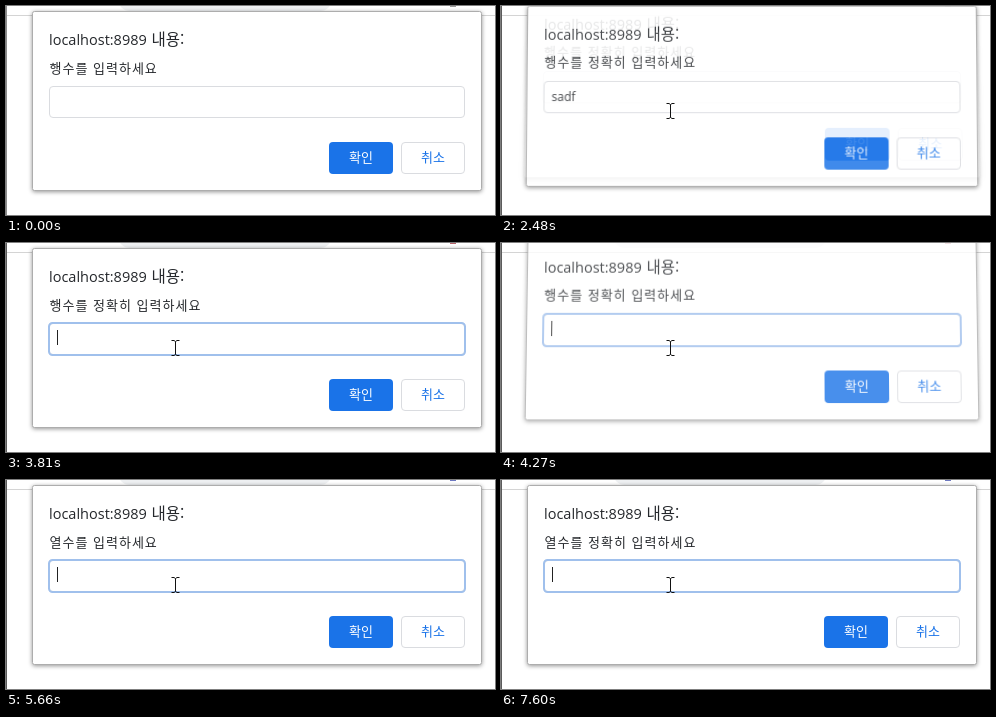
An HTML page that plays this animation: 489 px wide and 209 px high, repeating every 8 s.

```html
<!DOCTYPE html>
<html lang="ko">
<head>
<meta charset="utf-8">
<title>Prompt dialog</title>
<style>
  html, body { margin: 0; width: 100%; height: 100%; overflow: hidden; background: #fff; }
  svg { position: absolute; left: 0; top: 0; width: 489px; height: 209px; }
  .dialog { transform-origin: 251px 95.5px; }
  .panel { filter: drop-shadow(0 1px 2px rgba(0, 0, 0, .42)); }
  text { font-family: "Open Sans", "Noto Sans CJK KR", "Noto Sans CJK", sans-serif; fill: #24272b; }
  .ko { font-family: "Noto Sans CJK KR", "Noto Sans CJK", sans-serif; }
  .host { font-size: 14.5px; }
  .title { font-size: 15.5px; }
  .label { font-size: 13px; letter-spacing: 1px; }
  .value { font-size: 12px; }
  .button { font-size: 13px; text-anchor: middle; }
</style>
</head>
<body>
<svg viewBox="0 0 489 209">
  <rect x="112" y="-20" width="214" height="25" rx="12" fill="#eef0f2"/>
  <rect y="9" width="489" height="1" fill="#d4d4d4"/>
  <rect id="mark" x="444" width="6" height="1"/>
  <rect id="edge" width="1" height="209"/>
</svg>

<svg id="main" class="dialog" viewBox="0 0 489 209">
  <rect class="panel" x="26.5" y="5.5" width="449" height="179" rx="2" fill="#fff" stroke="#adadad"/>
  <text class="host" x="43" y="39">localhost:8989</text>
  <text class="title ko" x="145.5" y="39">내용:</text>
  <text class="label ko" x="43.5" y="66.5"></text>
  <rect class="field" x="43.5" y="80.5" width="415" height="31" rx="3.5" fill="#fff" stroke="#dadce0"/>
  <rect class="ring" x="43" y="80" width="416" height="32" rx="3.5" fill="none" stroke="#a0c0ec" stroke-width="2"/>
  <text class="value" x="51" y="100"></text>
  <rect class="caret" y="87" width="1" height="15" fill="#222"/>
  <rect x="323" y="136" width="64" height="32" rx="4" fill="#1a73e8"/>
  <text class="button ko" x="355" y="156.3" style="fill:#fff;font-weight:500">확인</text>
  <rect x="395.5" y="136.5" width="63" height="31" rx="3.5" fill="#fff" stroke="#dadce0"/>
  <text class="button ko" x="427" y="156.3" style="fill:#1a73e8">취소</text>
</svg>

<svg viewBox="0 0 489 209">
  <path id="arrow" d="M.5.5V15.5L4 12.2 6.4 17.8 8.8 16.8 6.5 11.3H11.3Z" fill="#fff" stroke="#000"/>
  <path id="beam" d="M-3.5-7.5H-1L.5-6.5 2-7.5H4.5M.5-6.5V6.5M-3.5 7.5H-1L.5 6.5 2 7.5H4.5" fill="none" stroke="#111"/>
</svg>

<script>
const LOOP = 8000;
const ROW = "행수를 입력하세요";
const ROW_AGAIN = "행수를 정확히 입력하세요";
const COL = "열수를 입력하세요";
const COL_AGAIN = "열수를 정확히 입력하세요";
const CHAR = { s: 5.7, a: 6.7, d: 7.4, f: 4, 3: 6.9 };

const $ = id => document.getElementById(id);
const main = $("main");
const ghost = main.cloneNode(true);
ghost.removeAttribute("id");
main.after(ghost);

// Each step holds until the next one starts.
const steps = [];
let now = { msg: ROW, value: "", caret: false, ring: false, lift: 0, alpha: 1, next: "" };
function at(time, change) {
  now = { ...now, next: "", ...change };
  steps.push({ time, ...now });
}
function type(time, value, caret = true) {
  at(time, { value, caret });
}
// The answered dialog lifts off while the following one drops in.
function swap(times, msg) {
  const drop = [
    { lift: .55, alpha: .95, caret: false, ring: false, next: msg },
    { msg, value: "", caret: true, ring: true, lift: 1, alpha: .8, next: "" },
    { lift: .25, alpha: .96 },
    { lift: 0, alpha: 1 }
  ];
  if (times.length === 3) drop.splice(2, 1);
  times.forEach((time, i) => at(time, drop[i]));
}

at(0, {});
at(680, { ring: true, caret: true });
type(1080, "sdf");
at(1620, { caret: false });
swap([1700, 1780, 1850, 1930], ROW_AGAIN);
type(2160, "sadf");
swap([2480, 2560, 2640, 2710], ROW_AGAIN);
type(2960, "sa");
type(3020, "sadf");
swap([3260, 3340, 3410], ROW_AGAIN);
swap([3580, 3660, 3730, 3810], ROW_AGAIN);
swap([3960, 4040, 4110], ROW_AGAIN);
swap([4190, 4270, 4350], ROW_AGAIN);
swap([4430, 4510, 4590, 4660], ROW_AGAIN);
type(5050, "3", false);
type(5130, "3");
swap([5500, 5580, 5660], COL);
at(5970, { caret: false });
type(6520, "sa");
type(6600, "sadf");
swap([6830, 6900, 6980, 7050], COL_AGAIN);
type(7210, "sa");
type(7290, "sadf");
swap([7440, 7520, 7600], COL_AGAIN);

function paint(box, s) {
  const part = name => box.querySelector("." + name);
  const width = [...s.value].reduce((sum, c) => sum + CHAR[c], 0);
  part("label").textContent = s.msg;
  part("value").textContent = s.value;
  part("ring").style.opacity = s.ring ? 1 : 0;
  part("caret").style.opacity = s.caret ? 1 : 0;
  part("caret").setAttribute("x", Math.round(51 + width));
  box.style.opacity = s.alpha;
  box.style.transform = s.lift
    ? `translateY(${-9 * s.lift}px) scale(${1 + .004 * s.lift}, ${1 + .012 * s.lift}) ` +
      `perspective(1000px) rotateX(${4 * s.lift}deg)`
    : "none";
}

function place(el, show, x, y) {
  el.style.display = show ? "" : "none";
  el.setAttribute("transform", `translate(${Math.round(x)} ${Math.round(y)})`);
}

function pointer(t) {
  if (t < 520) {
    const tick = Math.floor((t - 70 + 5) / 75);
    const rest = (1 - Math.max(0, tick) / 6) ** 1.6;
    place($("arrow"), t >= 70, 170 + 180 * rest, 109 + 81 * rest);
    place($("beam"), false, 0, 0);
    return;
  }
  place($("arrow"), false, 0, 0);
  const [x, y] = t < 840 ? [170, 109] : t < 920 ? [165, 107] : [169, 105];
  place($("beam"), true, x, y);
}

let shown;
function draw(t) {
  pointer(t);
  const s = steps.findLast(step => step.time <= t);
  if (s === shown) return;
  shown = s;
  paint(main, s);
  ghost.style.display = s.next ? "" : "none";
  if (s.next) paint(ghost, { ...s, msg: s.next, value: "", lift: 1.65, alpha: .12 });
  $("edge").setAttribute("fill", t < 680 ? "#8c8c8c" : "#5c5c5c");
  $("mark").setAttribute("fill", t < 3260 ? "#999" : t < 5500 ? "#b5636a" : "#6d78c0");
}

const start = performance.now();
function frame() {
  draw((performance.now() - start) % LOOP);
  requestAnimationFrame(frame);
}
draw(0);
requestAnimationFrame(frame);
</script>
</body>
</html>
```
